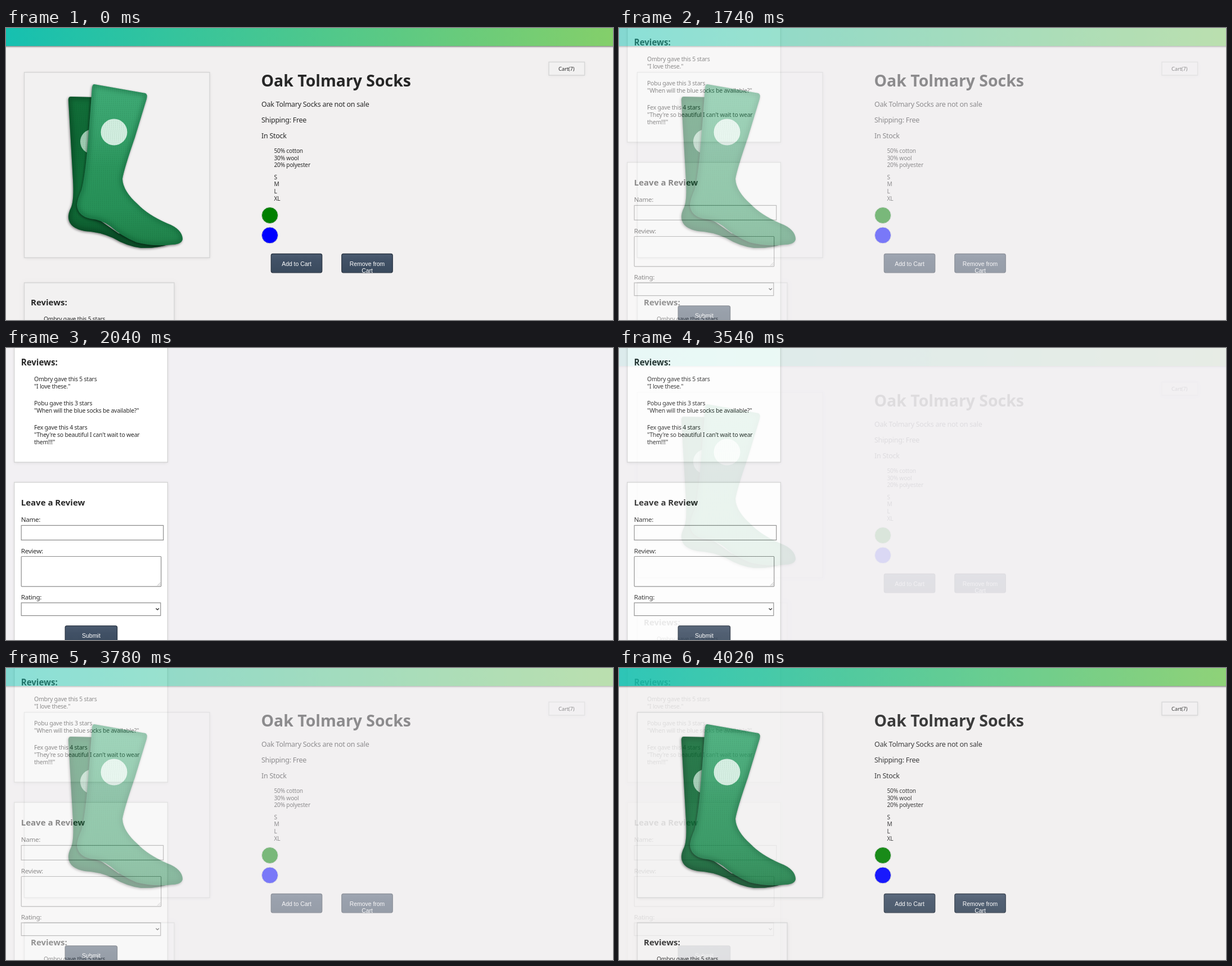
Write an HTML page with a canvas that moves like this. It is 1079x519 px and loops after 4080 ms.

```html
<!DOCTYPE html>
<html lang="en">
<head>
<meta charset="utf-8">
<title>Sock shop</title>
<style>
  html, body { margin: 0; width: 100%; height: 100%; overflow: hidden; background: #f2f0f1; }
  canvas { display: block; }
</style>
</head>
<body>
<canvas id="stage" width="1079" height="519"></canvas>
<script>
const W = 1079, H = 519;
const HOLD = 1500, STEP = 60, FADE = 9 * STEP, LOOP = 2 * (HOLD + FADE);
const INK = '#2a2a2a';
const SANS = '"Noto Sans", "Open Sans", sans-serif';
const ARIAL = '"Liberation Sans", Arial, sans-serif';

function makePage(paint) {
  const page = document.createElement('canvas');
  page.width = W;
  page.height = H;
  paint(page.getContext('2d'));
  return page;
}

function text(c, str, x, y, size, color = INK) {
  c.font = `${size}px ${SANS}`;
  c.letterSpacing = `${-0.022 * size}px`;
  c.textAlign = 'left';
  c.fillStyle = color;
  c.fillText(str, x, y);
}

function heading(c, str, x, y, size) {
  c.font = `bold ${size}px ${SANS}`;
  c.letterSpacing = '0px';
  c.textAlign = 'left';
  c.fillStyle = '#262626';
  c.fillText(str, x, y);
}

function lines(c, list, x, y, gap, size) {
  list.forEach((str, i) => text(c, str, x, y + i * gap, size));
}

function box(c, x, y, w, h, fill, border, width = 1, radius = 0) {
  c.beginPath();
  c.roundRect(x, y, w, h, radius);
  c.fillStyle = fill;
  c.fill();
  c.strokeStyle = border;
  c.lineWidth = width;
  c.stroke();
}

function card(c, x, y, w, h, fill, shade = 0.1) {
  c.save();
  c.shadowColor = `rgba(0,0,0,${shade})`;
  c.shadowBlur = 6;
  c.shadowOffsetY = 1;
  c.fillStyle = fill;
  c.fillRect(x, y, w, h);
  c.restore();
  box(c, x, y, w, h, fill, '#d6d6d6', 1.4);
}

function button(c, x, y, w, h, labels, baseline, size) {
  const g = c.createLinearGradient(0, y, 0, y + h);
  g.addColorStop(0, '#4b5b70');
  g.addColorStop(0.35, '#415166');
  g.addColorStop(1, '#3a4a5d');
  box(c, x, y, w, h, g, '#2b3644', 1.3, 3);
  c.font = `${size}px ${ARIAL}`;
  c.letterSpacing = '0px';
  c.textAlign = 'center';
  c.fillStyle = '#fff';
  labels.forEach((str, i) => c.fillText(str, x + w / 2, baseline + i * 12));
}

function disc(c, x, y, r, fill, border) {
  c.beginPath();
  c.arc(x, y, r, 0, 2 * Math.PI);
  c.fillStyle = fill;
  c.fill();
  if (border) {
    c.strokeStyle = border;
    c.lineWidth = 1;
    c.stroke();
  }
}

function sock(c, shape, stops, edge, badge) {
  const path = new Path2D(shape);
  const g = c.createLinearGradient(200, 100, 215, 390);
  stops.forEach((color, i) => g.addColorStop(i / (stops.length - 1), color));
  c.save();
  c.shadowColor = 'rgba(0,0,0,.5)';
  c.shadowBlur = 4;
  c.shadowOffsetX = -1;
  c.shadowOffsetY = 1.5;
  c.fillStyle = g;
  c.fill(path);
  c.restore();

  c.save();
  c.clip(path);
  disc(c, ...badge);
  // knitted ribs
  c.strokeStyle = 'rgba(0,50,25,.13)';
  c.lineWidth = 1;
  c.setLineDash([2, 1.5]);
  c.beginPath();
  for (let x = 90; x < 330; x += 3.6) {
    c.moveTo(x + 14, 95);
    c.lineTo(x, 260);
    c.lineTo(x + 6, 395);
  }
  c.stroke();
  c.setLineDash([]);
  c.filter = 'blur(4px)';
  c.strokeStyle = edge;
  c.lineWidth = 8;
  c.stroke(path);
  c.restore();
}

function paintProduct(c) {
  c.fillStyle = '#f2f0f0';
  c.fillRect(0, 0, W, H);

  const bar = c.createLinearGradient(0, 0, W, 0);
  bar.addColorStop(0, '#16c0b0');
  bar.addColorStop(1, '#84cf6a');
  c.save();
  c.shadowColor = 'rgba(0,0,0,.6)';
  c.shadowBlur = 3;
  c.shadowOffsetY = 1;
  c.fillStyle = bar;
  c.fillRect(-5, -5, W + 10, 37);
  c.restore();

  card(c, 32.5, 78.7, 329.5, 329.5, '#f2f1f1');
  sock(c,
    'M116 122L156 123L150 330L200 365L290 384Q270 392 240 391Q215 388 190 373' +
    'Q165 362 140 361Q113 356 111 338Q110 330 116 318Q121 305 119 270L111 130Q110 121 116 122Z',
    ['#13703a', '#0f6835', '#11713a', '#0d552c'], 'rgba(0,40,18,.45)',
    [154, 202, 22, '#9fcbb2']);
  sock(c,
    'M157 100L248 116Q252 118 250 126L229 195Q210 250 207 268Q208 290 234 313' +
    'Q252 332 286 347Q313 357 314 375Q313 384 296 385Q262 389 232 381Q205 370 185 352' +
    'Q170 341 150 339Q127 334 126 314Q127 304 134 288Q140 268 146 200L153 106Q154 99 157 100Z',
    ['#40ac77', '#38a36d', '#2b965d', '#279158', '#1f8149'], 'rgba(0,70,35,.4)',
    [192, 185, 23.5, '#d2eee0']);

  card(c, 965, 60.5, 63.5, 23.5, '#f2f1f1', 0.06);
  text(c, 'Cart(7)', 982, 75.8, 9.5);

  heading(c, 'Oak Tolmary Socks', 453.5, 103.5, 28.4);
  lines(c, ['Oak Tolmary Socks are not on sale', 'Shipping: Free', 'In Stock'], 454, 140.2, 28, 12.5);
  lines(c, ['50% cotton', '30% wool', '20% polyester'], 476.5, 222, 12.6, 10.2);
  lines(c, ['S', 'M', 'L', 'XL'], 476.5, 268.8, 12.6, 10.2);

  disc(c, 469, 333, 14.5, '#008000', '#d2d2d2');
  disc(c, 469, 368.4, 14.5, '#0000ff', '#d2d2d2');
  button(c, 471.3, 401.5, 90.4, 33.3, ['Add to Cart'], 422.6, 10.4);
  button(c, 596.8, 401.5, 90.4, 33.3, ['Remove from', 'Cart'], 422.6, 10.4);

  card(c, 32.5, 452.7, 266.5, 90, '#f2f1f1');
  heading(c, 'Reviews:', 44, 493.3, 15);
  text(c, 'Ombry gave this 5 stars', 67, 520.5, 10.3);
}

function paintReviews(c) {
  c.fillStyle = '#f2f0f3';
  c.fillRect(0, 0, W, H);

  card(c, 14.7, -20, 272.6, 223, '#fff');
  heading(c, 'Reviews:', 26.7, 30.6, 15.1);
  lines(c, ['Ombry gave this 5 stars', '"I love these."'], 50, 59, 12.8, 10.5);
  lines(c, ['Pobu gave this 3 stars', '"When will the blue socks be available?"'], 50, 102.2, 12.8, 10.5);
  lines(c, ['Fex gave this 4 stars', '"They\'re so beautiful I can\'t wait to wear', 'them!!!"'], 50, 145.4, 12.8, 10.5);

  card(c, 14.7, 238.7, 272.6, 320, '#fff');
  heading(c, 'Leave a Review', 26.7, 280.2, 15);
  text(c, 'Name:', 26.7, 309.2, 11.6);
  text(c, 'Review:', 26.7, 364.8, 11.6);
  text(c, 'Rating:', 26.7, 447.2, 11.6);
  box(c, 27.2, 315.3, 252.5, 26, '#fff', '#8c8c8c', 1.2);
  box(c, 27.2, 370.5, 248.5, 53.3, '#fff', '#8c8c8c', 1.2, 1);
  box(c, 27.2, 452.8, 247.6, 22.8, '#fff', '#8c8c8c', 1.2);

  // resize grip and select arrow
  c.strokeStyle = '#999';
  c.lineWidth = 0.8;
  c.beginPath();
  c.moveTo(269, 422.5);
  c.lineTo(274.5, 417);
  c.moveTo(272, 422.5);
  c.lineTo(274.5, 420);
  c.stroke();
  c.strokeStyle = '#222';
  c.lineWidth = 1.4;
  c.beginPath();
  c.moveTo(266.5, 462.8);
  c.lineTo(269.2, 465.4);
  c.lineTo(271.9, 462.8);
  c.stroke();

  button(c, 105.2, 493.8, 92.4, 34, ['Submit'], 515.4, 10.6);
}

const product = makePage(paintProduct);
const reviews = makePage(paintReviews);
const ctx = document.getElementById('stage').getContext('2d');

// share of the reviews page, in tenths
function mix(t) {
  const half = HOLD + FADE;
  const s = t % half;
  const m = s < HOLD ? 0 : (Math.floor((s - HOLD) / STEP) + 1) / 10;
  return t < half ? m : 1 - m;
}

function draw(now) {
  ctx.globalAlpha = 1;
  ctx.drawImage(product, 0, 0);
  ctx.globalAlpha = mix(now % LOOP);
  ctx.drawImage(reviews, 0, 0);
}

const start = performance.now();
function tick() {
  draw(performance.now() - start);
  requestAnimationFrame(tick);
}
tick();
</script>
</body>
</html>
```
